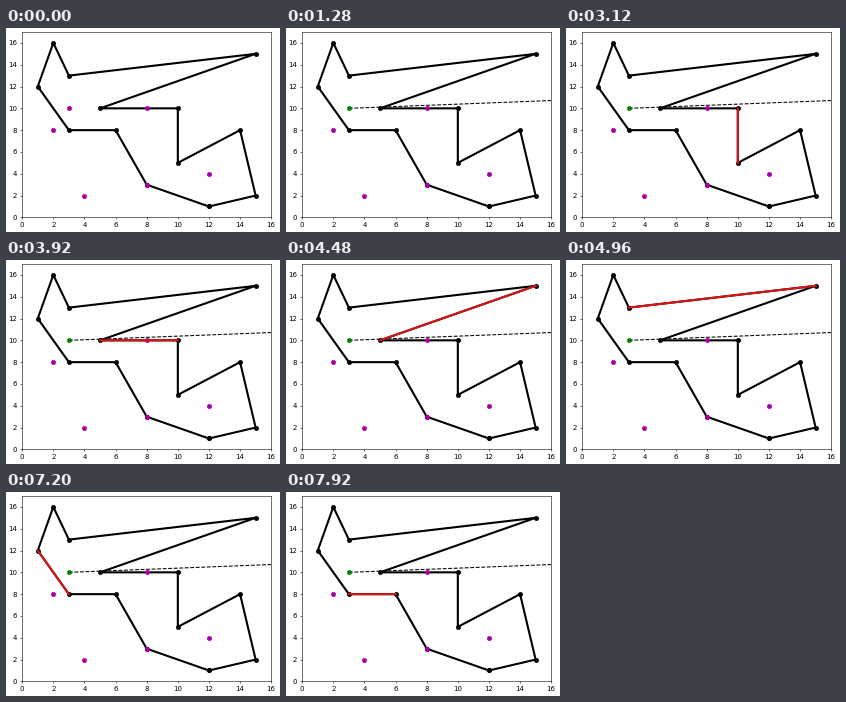
These frames come from a looping animation (274x204 px, 8000 ms). A matplotlib script:

```python
import matplotlib.pyplot as plt
from matplotlib.animation import FuncAnimation

W, H, DPI = 274, 204, 50
STEP, FRAMES = 80, 100
RAY_ON = 720                  # ms, test point and ray appear
EDGE_ON, EDGE_MS = 1940, 667  # ms, first edge check and time per edge
FIRST_EDGE = 2
SLOPE = 0.055

# corners in drawing order, then the points to classify
polygon = [(12, 1), (15, 2), (14, 8), (10, 5), (10, 10), (5, 10), (15, 15),
           (3, 13), (2, 16), (1, 12), (3, 8), (6, 8), (8, 3)]
points = [(2, 8), (4, 2), (8, 3), (8, 10), (12, 4)]
tested = (3, 10)

plt.rcParams.update({"font.family": "DejaVu Sans", "font.size": 10})
fig = plt.figure(figsize=(W / DPI, H / DPI), dpi=DPI, facecolor="white")
left, right, top, bottom = 16.2, 265.2, 4, 189.4
ax = fig.add_axes([left / W, 1 - bottom / H, (right - left) / W, (bottom - top) / H])
ax.set(xlim=(0, 16), ylim=(0, 17), xticks=range(0, 17, 2), yticks=range(0, 17, 2))


def plot(path, style, color, **kw):
    return ax.plot(*zip(*path), style, color=color, ms=6, snap=False, **kw)[0]


plot(polygon + polygon[:1], "o-", "black", lw=3)
plot(points, "o", "#a800a8")
ray = plot([tested, (20, 10 + 17 * SLOPE)], "--", "black", lw=1.5)
dot = plot([tested], "o", "#a800a8")
edge = plot(polygon[:2], "-", "#d81414", lw=3)


def draw(i):
    t = i * STEP
    testing, checking = t >= RAY_ON, t >= EDGE_ON
    ray.set_visible(testing)
    dot.set_color("#008000" if testing else "#a800a8")
    edge.set_visible(checking)
    if checking:
        k = FIRST_EDGE + (t - EDGE_ON) // EDGE_MS
        edge.set_data(*zip(*(polygon[j % len(polygon)] for j in (k, k + 1))))
    return ray, dot, edge


anim = FuncAnimation(fig, draw, frames=FRAMES, interval=STEP, repeat=True, repeat_delay=0)
plt.show()
```
